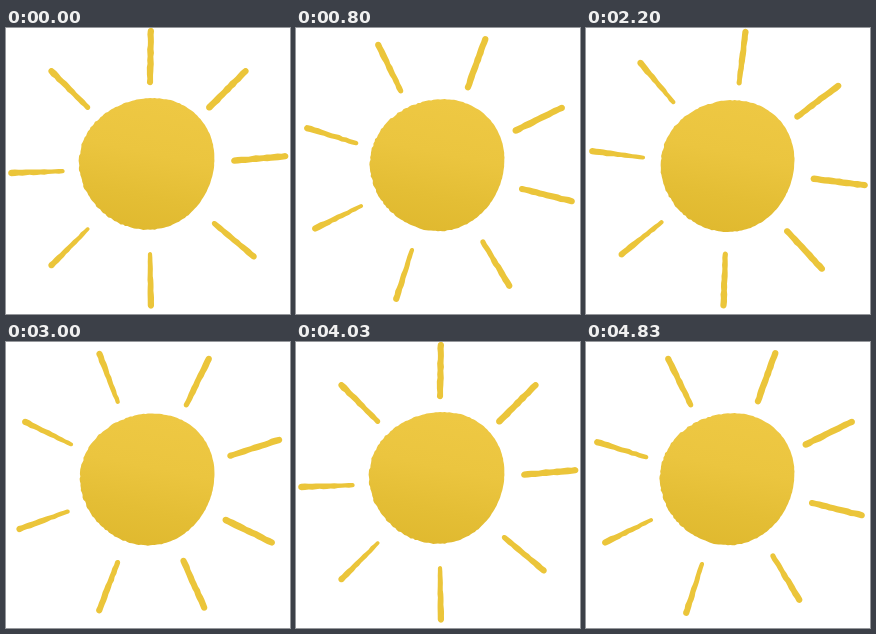
These frames come from a looping animation (284 px wide and 286 px high, 5030 ms). An HTML page:

```html
<!DOCTYPE html>
<html lang="en">
<head>
<meta charset="utf-8">
<title>Sun</title>
<style>
html, body { margin: 0; width: 100%; height: 100%; overflow: hidden; background: #fff; }
svg { display: block; width: 100vw; height: 100vh; }
</style>
</head>
<body>
<svg viewBox="0 0 284 286">
  <defs>
    <linearGradient id="paint" gradientUnits="userSpaceOnUse" x1="156" y1="73" x2="130" y2="204">
      <stop offset="0" stop-color="#eec843"/>
      <stop offset=".4" stop-color="#ebc53f"/>
      <stop offset=".72" stop-color="#e4be35"/>
      <stop offset="1" stop-color="#e0b92f"/>
    </linearGradient>
  </defs>
  <path id="rays" fill="#ebc53a"/>
  <path id="disc" fill="url(#paint)"/>
</svg>
<script>
const LOOP = 5030, CYCLE = 4030, STEP = 200, DRAWINGS = 20;
const { PI, sin, cos, min, floor } = Math;
const RAD = PI / 180;

const PIVOT = { x: 142.5, y: 140.2 };
const INNER = 86, OUTER = 137.3;
const RAY_ANGLES = [-89, -45, -5, 40, 89, 135, 178, 225];

const rays = document.getElementById('rays');
const disc = document.getElementById('disc');

function random(seed) {
  return () => {
    seed = (seed * 16807) % 2147483647;
    return seed / 2147483647 - 0.5;
  };
}

const outline = points =>
  'M' + points.map(p => p.map(v => v.toFixed(2)).join(' ')).join('L') + 'Z';

// A brush stroke along a radius, with round ends and rough edges.
function rayPath(angle, innerWidth, outerWidth, rand) {
  const points = [], ux = cos(angle), uy = sin(angle);
  const add = (along, side) =>
    points.push([PIVOT.x + ux * along - uy * side, PIVOT.y + uy * along + ux * side]);
  const cap = (at, r, from) => {
    for (let a = 0; a <= 180; a += 30) {
      add(at + cos(from + a * RAD) * r, sin(from + a * RAD) * r);
    }
  };
  const edge = side => {
    for (let j = 1; j < 14; j++) {
      const f = side < 0 ? j / 14 : 1 - j / 14;
      const half = (innerWidth + (outerWidth - innerWidth) * f) / 2;
      add(INNER + (OUTER - INNER) * f, side * (half + rand() * 0.7));
    }
  };
  edge(-1);
  cap(OUTER, outerWidth / 2, -PI / 2);
  edge(1);
  cap(INNER, innerWidth / 2, PI / 2);
  return outline(points);
}

function raysPath(k) {
  const turn = 90 * k / (DRAWINGS - 1), rand = random(811 + k * 97);
  return RAY_ANGLES.map((angle, i) => {
    const innerWidth = 5.2 + 1.4 * cos((i - 1) * PI / 4);
    return rayPath((angle + turn) * RAD, innerWidth, 6.3, rand);
  }).join('');
}

// A lopsided circle that sinks and narrows a little halfway through.
function discPath(k) {
  const dip = sin(PI * k / DRAWINGS), rand = random(401 + k * 53), points = [];
  const x = 141.9, y = 135.2 + 2.2 * dip;
  for (let deg = 0; deg < 360; deg += 2) {
    const a = deg * RAD;
    const lopsided = 1.2 * cos(2 * a + 58 * RAD) + 1.1 * cos(3 * a + 133 * RAD);
    const swell = (1 - 1.6 * dip) * min(0, cos(a)) ** 2;
    const rough = rand() * (0.8 - 0.5 * cos(a)); // the left edge is rougher
    const r = 66.5 + lopsided + swell + rough;
    points.push([x + r * cos(a), y + r * sin(a)]);
  }
  return outline(points);
}

let shown = -1;
function draw(time) {
  const k = min(floor((time % LOOP % CYCLE) / STEP), DRAWINGS - 1);
  if (k === shown) return;
  shown = k;
  rays.setAttribute('d', raysPath(k));
  disc.setAttribute('d', discPath(k));
}

const start = performance.now();
function tick() {
  draw(performance.now() - start);
  requestAnimationFrame(tick);
}
tick();
</script>
</body>
</html>
```
